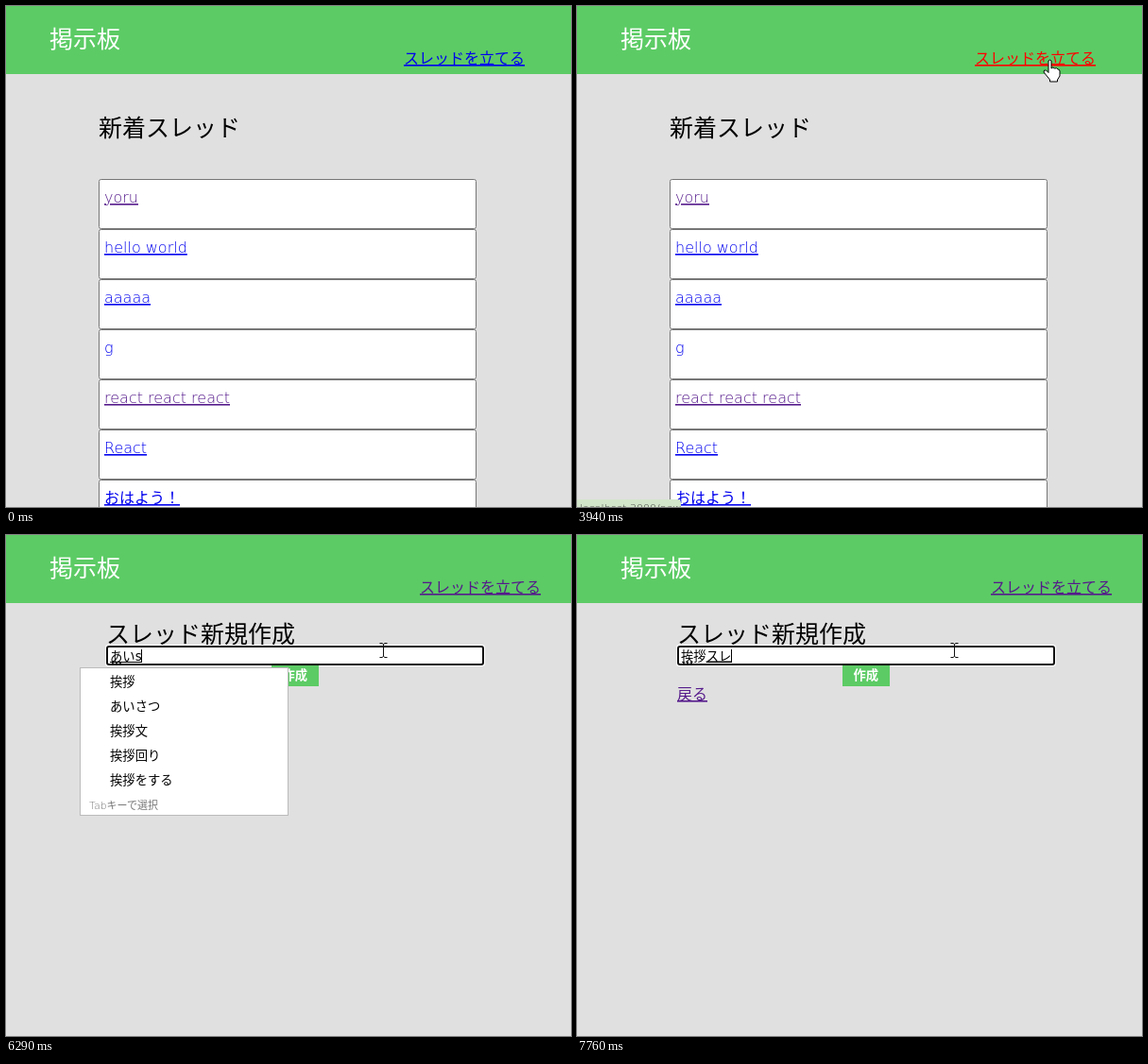
These frames come from a looping animation (598x530 px, 8000 ms). An HTML page:

```html
<!DOCTYPE html>
<html lang="ja">
<head>
<meta charset="utf-8">
<title>掲示板</title>
<style>
  html, body { margin: 0; width: 100%; height: 100%; overflow: hidden; background: #e0e0e0; }
  svg { display: block; }
  text { font: 300 16px "DejaVu Sans", "Noto Sans CJK JP", "Noto Sans CJK", sans-serif; white-space: pre; }
  .title { font-size: 25px; }
  .small { font-size: 13.333px; font-weight: 400; }
  .link { fill: #00e; text-decoration: underline 1px; text-underline-offset: 2px; }
  .visited { fill: #551a8b; }
  .hover { fill: #f00; }
  .box { fill: #fff; stroke: #767676; }
  .field.over { stroke: #4f4f4f; }
  .field.focus { stroke: #101010; stroke-width: 2; }
  .cursor { fill: #fff; stroke: #000; stroke-linejoin: round; }
</style>
</head>
<body>
<svg width="598" height="530" viewBox="0 0 598 530">
  <rect width="598" height="72" fill="#5ccb65"/>
  <text class="title" x="46" y="44" fill="#fff">掲示板</text>
  <text id="create" class="link" y="61">スレッドを立てる</text>

  <g id="listPage">
    <text class="title" x="98" y="138">新着スレッド</text>
    <g id="rows"></g>
  </g>

  <g id="formPage">
    <text class="title" x="106" y="114">スレッド新規作成</text>
    <rect id="halo" x="105" y="116" width="402" height="23" rx="3" fill="#fff"/>
    <rect id="field" class="box field" rx="2"/>
    <g id="dots" fill="#333">
      <rect x="112" y="134" width="2" height="2"/>
      <rect x="116" y="134" width="2" height="2"/>
      <rect x="120" y="134" width="2" height="2"/>
    </g>
    <text id="typed" class="small" x="110" y="133"></text>
    <rect id="mark" y="134"/>
    <rect id="caret" y="121" width="1" height="14"/>
    <rect x="281" y="138" width="50" height="22" fill="#5ccb65"/>
    <text class="small" x="292.5" y="153" fill="#fff" style="font-weight:700">作成</text>
    <text class="link visited" x="106" y="174">戻る</text>
  </g>

  <g id="popup">
    <rect id="panel" class="box" x="78.5" y="140.5" height="156" style="stroke:#bbb"/>
    <g id="words"></g>
    <text x="88" y="290" fill="#777" style="font-size:11px">Tabキーで選択</text>
  </g>

  <g id="status">
    <path d="M0 530V522H106Q110 522 110 526V530Z" fill="#d2e6c9"/>
    <text x="3" y="535" fill="#444" style="font-size:11px">localhost:3000/new</text>
  </g>

  <g id="pointer">
    <path id="arrow" class="cursor" d="M.5 .5V16L4 12.8 6.4 18.6 8.8 17.6 6.4 12H11Z"/>
    <path id="hand" class="cursor" d="M0 1Q2 -1 3 1V9Q5 7 6.500 9Q9 8 10 10Q12 10 12 12V17L9.500 21V23H1.500V21L-5 13Q-5 10 -2.500 11L0 13.500Z"/>
    <path id="beam" fill="none" stroke="#111" d="M-3.500 -7.500H-1L.5 -6.500 2 -7.500H4.500M.5 -6.500V6.500M-3.500 7.500H-1L.5 6.500 2 7.500H4.500"/>
  </g>
</svg>
<script>
const LOOP = 8000, STEP = 65;
const $ = id => document.getElementById(id);
const show = (id, on) => { $(id).style.display = on ? '' : 'none'; };
const set = (id, attrs) => { for (const k in attrs) $(id).setAttribute(k, attrs[k]); };

const threads = ['yoru', 'hello world', 'aaaaa', 'g', 'react react react', 'React', 'おはよう！'];
const read = [0, 4];
$('rows').innerHTML = threads.map((name, i) => {
  const y = 183 + i * 53;
  return `<rect class="box" x="98.5" y="${y + .5}" width="399" height="52" rx="2"/>
    <text class="link ${read.includes(i) ? 'visited' : ''}" x="104" y="${y + 25}">${name}</text>`;
}).join('');

// Pointer runs: [time, x, y], at rest between runs
const runs = [
  [[210, 580, 479], [340, 556, 400], [470, 535, 334]],
  [[740, 537, 328], [800, 541, 320]],
  [[1060, 543, 320], [1300, 555, 296], [1600, 541, 267]],
  [[2340, 541, 267], [2600, 542, 265], [2690, 542, 265], [2850, 558, 215], [3000, 520, 130], [3140, 467, 86]],
  [[3210, 474, 80], [3280, 485, 69]],
  [[3480, 488, 64], [3610, 497, 54], [3740, 499, 57]],
  [[4470, 499, 72], [4600, 500, 122]],
  [[4800, 480, 121], [4940, 387, 117]],
  [[5090, 392, 119], [5160, 399, 122]]
];

// Input states: [time, fixed text, text being composed, converted]
const typing = [
  [0, '', ''],
  [6020, '', 'あ'], [6150, '', 'あい'], [6290, '', 'あいs'], [6360, '', 'あいさ'],
  [6480, '', 'あいさt'], [6560, '', 'あいさつ'],
  [6890, '', '挨拶', true],
  [7170, '挨拶', 's'], [7240, '挨拶', 'す'], [7370, '挨拶', 'すr'], [7440, '挨拶', 'すれ'],
  [7760, '挨拶', 'スレ', true]
];

const popups = [
  { from: 6220, to: 6760, width: 220, words: ['挨拶', 'あいさつ', '挨拶文', '挨拶回り', '挨拶をする'] },
  { from: 7300, to: 7760, width: 186, words: ['スレ', 'スレッド', 'すれ', 'すれ違い', 'すれば'] }
];

const latest = (list, t, time) => list.filter(item => time(item) <= t).pop();

function pointerAt(t) {
  const run = latest(runs, t, r => r[0][0]);
  if (!run) return null;
  const start = run[0][0];
  const now = start + Math.floor((t - start) / STEP + .15) * STEP;
  const i = run.findIndex(p => p[0] > now);
  if (i < 0) return run[run.length - 1].slice(1);
  const a = run[i - 1], b = run[i], k = (now - a[0]) / (b[0] - a[0]);
  return [a[1] + (b[1] - a[1]) * k, a[2] + (b[2] - a[2]) * k].map(Math.round);
}

function drawPointer(t) {
  const at = pointerAt(t);
  show('pointer', at);
  if (!at) return;
  const shape = t >= 4600 ? 'beam' : t >= 3540 && t < 4470 ? 'hand' : 'arrow';
  for (const id of ['arrow', 'hand', 'beam']) show(id, id === shape);
  set('pointer', { transform: `translate(${at})` });
}

function drawField(t) {
  const focus = t >= 4800;
  show('halo', focus);
  set('field', focus
    ? { class: 'box field focus', x: 107, y: 118, width: 398, height: 19 }
    : { class: 'box field' + (t >= 4600 ? ' over' : ''), x: 106.5, y: 117.5, width: 399, height: 20 });
  show('dots', t >= 5300);

  const [, fixed, draft, converted] = latest(typing, t, s => s[0]);
  const measure = s => {
    $('typed').textContent = s;
    return s ? $('typed').getComputedTextLength() : 0;
  };
  const left = 110 + measure(fixed), right = 110 + measure(fixed + draft);
  set('mark', { x: left, y: converted ? 133.5 : 134, width: right - left, height: converted ? 1.5 : 1 });
  set('caret', { x: Math.floor(right) });
  show('caret', focus && !(t >= 5300 && t < 5820));
}

function drawPopup(t) {
  const list = popups.find(p => t >= p.from && t < p.to);
  show('popup', list);
  if (!list) return;
  set('panel', { width: list.width });
  $('words').innerHTML = list.words.map((w, i) =>
    `<text class="small" x="110" y="${160 + i * 26}">${w}</text>`).join('');
}

function draw() {
  const t = performance.now() % LOOP;
  const form = t >= 4070;
  show('listPage', !form);
  show('formPage', form);
  set('create', {
    x: form ? 438 : 421,
    class: 'link' + (form ? ' visited' : t >= 3540 ? ' hover' : '')
  });
  show('status', t >= 3675 && t < 4870);
  drawPointer(t);
  if (form) drawField(t);
  drawPopup(t);
  requestAnimationFrame(draw);
}
draw();
</script>
</body>
</html>
```
